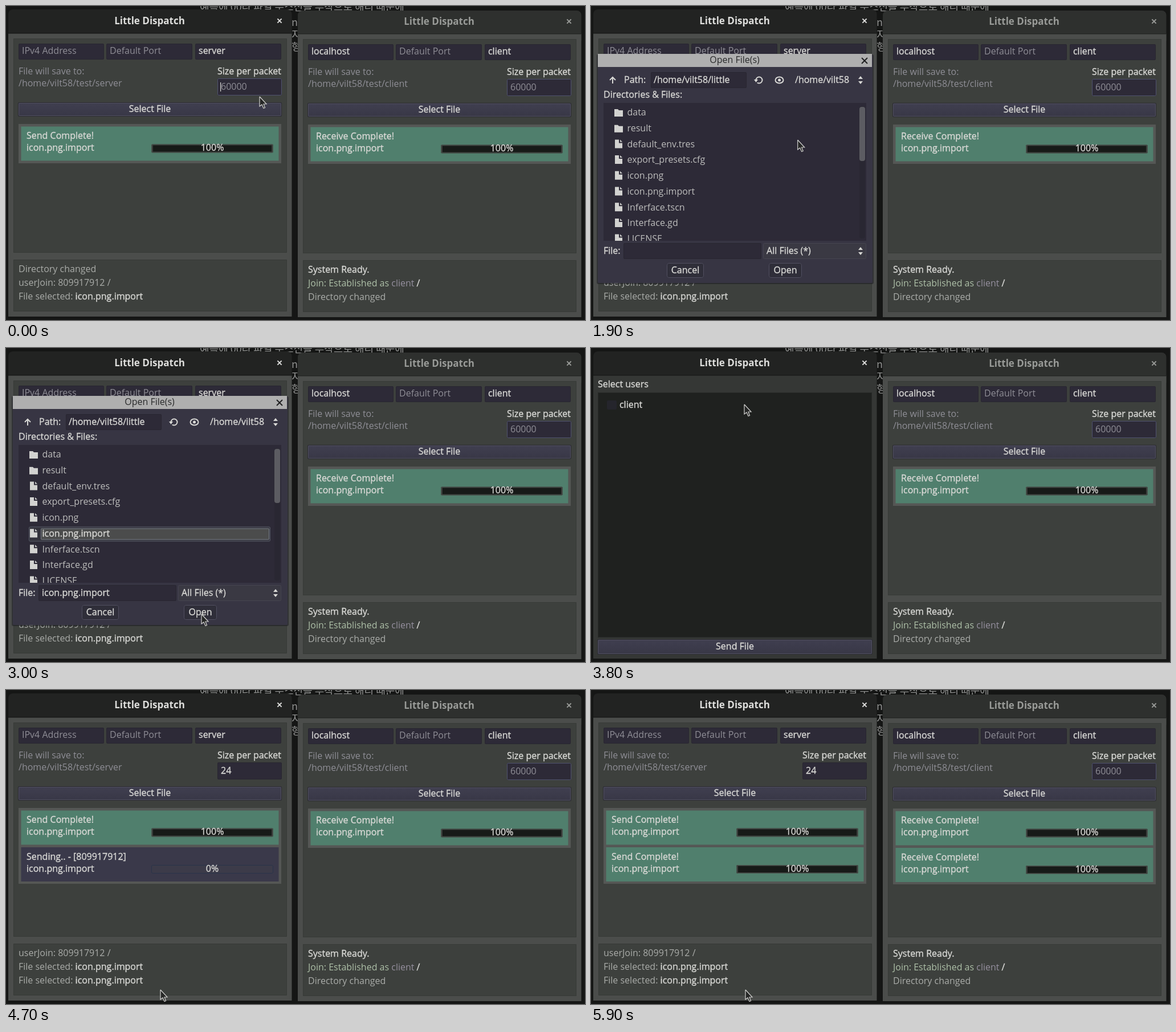
Write an HTML page with a canvas that moves like this. It is 1016x551 px and loops after 6.4 s.

```html
<!DOCTYPE html>
<html lang="en">
<head>
<meta charset="utf-8">
<style>
html, body { margin: 0; width: 100%; height: 100%; overflow: hidden; background: #151615; }
canvas { display: block; }
</style>
</head>
<body>
<canvas id="stage" width="1016" height="551"></canvas>
<script>
const c = document.getElementById('stage').getContext('2d');
const LOOP = 6400, TICK = 100;
const BODY = '16px "Open Sans", sans-serif';
const BOLD = 'bold 17px "Open Sans", sans-serif';
const KOREAN = '18px "Noto Sans CJK KR", "Noto Sans CJK", sans-serif';
const BRIGHT = '#d9d9d6', MID = '#aaaca9', DIM = '#8f8e96';
const FIELD = '#2d2a37', FRAME = '#4b4d4b', PANEL = '#3d403d';
const APP = 'Little Dispatch', HOME = '/home/vilt58';
const FILE = 'icon.png.import';
const FILES = ['data', 'result', 'default_env.tres', 'export_presets.cfg', 'icon.png',
  FILE, 'Inferface.tscn', 'Interface.gd', 'LICENSE'];

// Pointer stops: time, x, y
const PATH = [[0, 444, 158], [600, 444, 158], [800, 424, 191], [1700, 424, 191], [2300, 237, 320],
  [2500, 237, 320], [3000, 342, 466], [3300, 342, 466], [3800, 268, 98], [4100, 268, 98],
  [4500, 270, 525], [LOOP, 270, 525]];

function rect(x1, y1, x2, y2, fill, border, r = 0) {
  c.beginPath();
  c.roundRect(x1, y1, x2 - x1, y2 - y1, r);
  c.fillStyle = fill;
  c.fill();
  if (border) {
    c.beginPath();
    c.roundRect(x1 + .5, y1 + .5, x2 - x1 - 1, y2 - y1 - 1, r);
    c.lineWidth = 1;
    c.strokeStyle = border;
    c.stroke();
  }
}

// y is the middle of the lower-case letters; returns the right end
function text(s, x, y, color = BRIGHT, align = 'left', font = BODY) {
  c.font = font;
  c.textAlign = align;
  c.fillStyle = c.strokeStyle = color;
  c.fillText(s, x, y + 5.3);
  if (color === BRIGHT) {
    c.lineWidth = .35;
    c.strokeText(s, x, y + 5.3);
  }
  return x + c.measureText(s).width;
}

function line(points, color, width = 2) {
  c.beginPath();
  points.forEach(p => c.lineTo(...p));
  c.strokeStyle = color;
  c.lineWidth = width;
  c.stroke();
}

function shape(points, color) {
  c.beginPath();
  points.forEach(p => c.lineTo(...p));
  c.fillStyle = color;
  c.fill();
}

function clipped(x, y, w, h, draw) {
  c.save();
  c.beginPath();
  c.rect(x, y, w, h);
  c.clip();
  draw();
  c.restore();
}

function cross(x, y, r, color) {
  line([[x - r, y - r], [x + r, y + r]], color);
  line([[x + r, y - r], [x - r, y + r]], color);
}

function desktop() {
  rect(0, 0, 1016, 551, '#151615');
  text('예측에 00라 파일 수스신을 무작으로 해리 때문에', 340, 3, '#929392', 'left', KOREAN);
  clipped(501, 8, 11, 90, () => ['nc', '지', '형'].forEach((s, i) =>
    text(s, 501, 30 + i * 21.5, '#929392', 'left', KOREAN)));
}

function windowFrame(active, fill) {
  rect(4, active ? 6 : 7, 501.5, 60, active ? '#222322' : '#2e302e', null, [8, 8, 0, 0]);
  rect(4, 48, 501.5, 545, fill);
  rect(4, 47, 501.5, 48.5, active ? '#191a19' : '#252625');
  text(APP, 252, 27, active ? '#dededc' : '#999b98', 'center', BOLD);
  cross(480, 26, 3.6, active ? '#dededc' : '#999b98');
}

function button(label, x1, y1, x2, y2, pressed) {
  const g = c.createLinearGradient(0, y1, 0, y2);
  g.addColorStop(0, pressed ? '#090a0b' : '#403f50');
  g.addColorStop(1, pressed ? '#242430' : '#383746');
  rect(x1, y1, x2, y2, '#2a2a30', null, 2);
  rect(x1 + 1, y1 + 1, x2 - 1, y2 - 1, g, pressed ? '#858684' : '#515060', 1);
  text(label, (x1 + x2) / 2, (y1 + y2) / 2 - .5, BRIGHT, 'center');
}

function transfer(y, status, pct, busyColor, busyBorder) {
  const done = pct >= 100;
  rect(26.5, y, 478.5, y + 60, done ? '#507f6d' : busyColor);
  text(status, 36, y + 16.5);
  text(FILE, 36, y + 37.5);
  rect(255, y + 31, 469, y + 46, done ? '#393d3a' : '#3c3b49', done ? '#4a554e' : busyBorder, 2);
  rect(258, y + 33, 258 + 208 * pct / 100, y + 44, done ? '#171a18' : '#222423');
  text(pct + '%', 362, y + 37.5, BRIGHT, 'center');
}

function spans(y, ...parts) {
  let x = 22;
  for (const [s, color] of parts) x = text(s, x, y, color);
}

function mainScreen(o) {
  windowFrame(o.active, FRAME);
  rect(13, 57, 493, 433, PANEL, '#373a37');
  rect(13, 445, 493, 536, PANEL, '#373a37');
  [[o.address, 22, 172], ['Default Port', 176, 327], [o.name, 332, 483]].forEach(([s, x1, x2]) => {
    rect(x1, 66, x2, 94, FIELD, '#282630', 2);
    text(s, x1 + 6, 79, s === 'IPv4 Address' || s === 'Default Port' ? DIM : BRIGHT);
  });
  text('File will save to:', 22, 115, DIM);
  text(HOME + '/test/' + o.name, 22, 135.5, DIM);
  text('Size per packet', 371, 115);
  rect(371, 127, 484, 157, FIELD, o.framed ? '#50536f' : '#282630', 2);
  const end = text(o.size || '60000', 377, 141.5, o.size ? BRIGHT : DIM);
  if (o.caret) rect(o.size ? end : 376, 134, (o.size ? end : 376) + 1.2, 150, BRIGHT);
  button('Select File', 21, 169, 484, 194);
  const second = o.pct !== null;
  rect(22, 207, 483, second ? 340 : 276, '#555755');
  transfer(211.5, o.doneLabel, 100);
  if (second) transfer(276, o.pct < 100 ? o.busyLabel : o.doneLabel, o.pct, o.busyColor, o.busyBorder);
  o.log.forEach((parts, i) => spans(461.5 + i * 24, ...parts));
}

function icon(x, y, folder) {
  if (folder) {
    shape([[x, y - 6], [x + 6, y - 6], [x + 8, y - 4], [x + 15, y - 4], [x + 15, y + 7], [x, y + 7]], '#d2d2d0');
  } else {
    shape([[x + 1, y - 8], [x + 8, y - 8], [x + 8, y - 2], [x + 14, y - 2], [x + 14, y + 7], [x + 1, y + 7]], '#d2d2d0');
    shape([[x + 10, y - 8], [x + 14, y - 4], [x + 10, y - 4]], '#d2d2d0');
  }
}

function spinner(x, y) {
  shape([[x - 4, y - 2], [x, y - 7], [x + 4, y - 2]], BRIGHT);
  shape([[x - 4, y + 2], [x, y + 7], [x + 4, y + 2]], BRIGHT);
}

function dialog(chosen) {
  rect(10, 85, 496, 488, 'rgba(25,25,30,.5)', null, 3);
  rect(12, 85, 494, 486, '#373543', null, 2);
  rect(12, 84, 493, 107, '#afafaf');
  text('Open File(s)', 252, 95, '#292a2b', 'center');
  cross(480, 96, 5, '#202122');

  line([[38, 136], [38, 126]], BRIGHT);
  line([[33, 130], [38, 125], [43, 130]], BRIGHT);
  text('Path:', 58, 129.5);
  rect(105, 116, 273, 144, FIELD, '#282630', 2);
  text(HOME + '/little', 110, 129.5);
  c.strokeStyle = BRIGHT;
  c.lineWidth = 2;
  c.beginPath();
  c.arc(295, 130, 5.5, Math.PI, Math.PI * 2.7);
  c.stroke();
  shape([[286, 129], [293, 129], [289.5, 134]], BRIGHT);
  c.beginPath();
  c.ellipse(330.5, 130, 7, 5.5, 0, 0, 7);
  c.stroke();
  c.beginPath();
  c.arc(330.5, 130, 2.5, 0, 7);
  c.fill();
  text(HOME, 358, 129.5);
  spinner(473, 130);
  text('Directories & Files:', 22, 156);

  rect(22, 170, 483, 412, FIELD);
  clipped(22, 170, 461, 242, () => FILES.forEach((name, i) => {
    const y = 187 + i * 27.7, picked = chosen && name === FILE;
    if (picked) {
      rect(40, y - 12, 464, y + 14, '#34333c', '#565b68', 2);
      rect(61, y - 9, 462, y + 11, '#4b4c4c', '#757b86', 1);
    }
    icon(41, y, i < 2);
    text(name, 63.5, y, picked ? BRIGHT : '#bdbdbc');
  }));
  rect(471, 176, 481, 408, '#292732', null, 4);
  rect(471, 177, 481, 272, '#5c5c62', null, 4);

  text('File:', 22, 429.5);
  rect(57, 416, 299, 444, FIELD, '#282630', 2);
  if (chosen) text(FILE, 63, 429.5);
  rect(302, 416, 483, 444, '#3a3943', '#454450', 2);
  text('All Files (*)', 308, 429.5);
  spinner(473, 430);
  [['Cancel', 133, 198], ['Open', 312, 370]].forEach(([s, x1, x2]) => {
    rect(x1, 451, x2, 477, '#2f2e39', '#514f60', 3);
    text(s, (x1 + x2) / 2, 464, BRIGHT, 'center');
  });
}

function userScreen(checked, pressed) {
  windowFrame(true, '#353735');
  text('Select users', 12, 64);
  rect(12, 78, 493, 508, '#1f211f', '#272927');
  rect(28, 92, 45, 108, '#25252c', null, 2);
  if (checked) line([[32, 99], [36, 103], [42, 94]], '#eeeeec', 2.5);
  text('client', 50, 99.5);
  button('Send File', 11, 511, 494, 538, pressed);
}

function pointer(t) {
  const i = PATH.findIndex(p => p[0] > t);
  const [t0, x0, y0] = PATH[i - 1], [t1, x1, y1] = PATH[i];
  const k = (t - t0) / (t1 - t0);
  c.save();
  c.translate(x0 + (x1 - x0) * k, y0 + (y1 - y0) * k);
  const arrow = [[1, 1], [1, 18], [5, 15], [8, 21.5], [10.5, 20.5], [8, 14], [13, 14], [1, 1]];
  shape(arrow, '#262726');
  line(arrow, '#d0d0ce', 1.2);
  c.restore();
}

const joined = [['userJoin: 809917912 /', MID]];
const selected = [['File selected: ', MID], [FILE, BRIGHT]];
const changed = [['Directory changed', MID]];
const clientLog = [
  [['System Ready.', BRIGHT]],
  [['Join: Established as ', '#aec0a8'], ['client', '#96909f'], [' /', BRIGHT]],
  changed
];

function progress(t, lag) {
  return Math.max(0, Math.min(100, Math.floor((t - 4700) / TICK * 9.75 - lag)));
}

function render(t) {
  const sent = t >= 4700;
  desktop();
  c.save();
  c.translate(508, 1);
  mainScreen({
    active: false, address: 'localhost', name: 'client', size: '', framed: true,
    pct: t >= 4800 ? progress(t, 3) : null, doneLabel: 'Receive Complete!',
    busyLabel: 'Receiving.. - 2136291432', busyColor: '#232523', busyBorder: '#545459', log: clientLog
  });
  c.restore();

  if (t >= 3100 && !sent) {
    userScreen(t >= 4100, t >= 4500);
  } else {
    mainScreen({
      active: true, address: 'IPv4 Address', name: 'server',
      size: t < 100 ? '' : t < 300 ? '2' : '24', framed: t < 1700, caret: t < 1700,
      pct: sent ? progress(t, 0) : null, doneLabel: 'Send Complete!',
      busyLabel: 'Sending.. - [809917912]', busyColor: '#3a394a', busyBorder: '#293349',
      log: sent ? [joined, selected, selected] : [changed, joined, selected]
    });
    if (t >= 1700 && !sent) dialog(t >= 2300);
  }
  pointer(t);
}

function tick() {
  render(Math.floor(performance.now() % LOOP / TICK) * TICK);
  requestAnimationFrame(tick);
}
tick();
</script>
</body>
</html>
```
